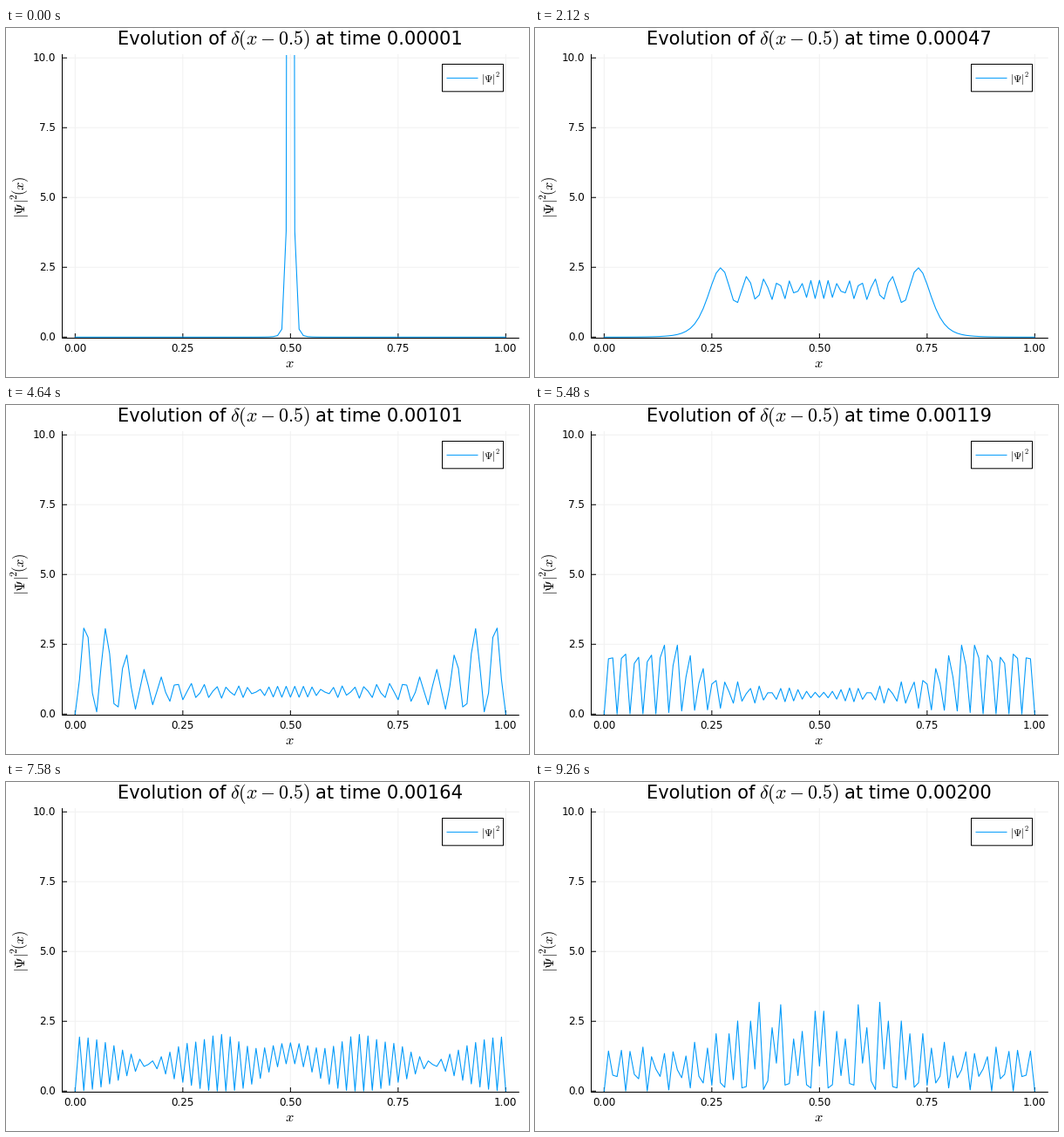
A matplotlib script for the animation above (9.28 s loop, 600 by 400 pixels).

```python
import numpy as np
import matplotlib.pyplot as plt
from matplotlib.animation import FuncAnimation
from matplotlib.patches import Rectangle

plt.rcParams.update({"font.family": "DejaVu Sans", "mathtext.fontset": "cm",
                     "path.snap": False})

W, H, DPI = 600, 400, 100
PX = 72 / DPI                      # one pixel in points
BLUE = "#009AFA"
LEFT, RIGHT, TOP, BOTTOM = 64.5, 588.3, 30.5, 355.5
DT, STEPS = 1e-5, 200
TICK_MS, TICKS = 20, 464


def to_x(x):
    return 79.35 + 494 * x


def to_y(y):
    return 354.25 - 32 * y


# Delta at the centre of an infinite well: only odd sine modes take part.
x = np.linspace(0, 1, 101)
modes = np.arange(1, 100, 2)
basis = 0.2 * np.sin(modes * np.pi / 2) * np.sin(np.pi * np.outer(x, modes))
times = DT * np.arange(1, STEPS + 1)
phases = np.exp(-1j * np.outer((modes * np.pi) ** 2, times))
density = np.abs(basis @ phases).T ** 2

fig = plt.figure(figsize=(W / DPI, H / DPI), dpi=DPI, facecolor="white")
ax = fig.add_axes([0, 0, 1, 1])
ax.set(xlim=(0, W), ylim=(H, 0))
ax.axis("off")


def line(xs, ys, color="black", width=1.0, **kw):
    return ax.plot(xs, ys, color=color, lw=width * PX, **kw)[0]


def label(px, py, text, size, **kw):
    return ax.text(px, py, text, fontsize=size * PX, va="baseline", **kw)


def squared_psi(px, py, size, tail="", upright=True):
    """|Psi| with a high, tight exponent, reading rightwards or upwards."""
    parts = [(r"$|\Psi|$", 0, 0, 1), ("$2$", 1.3, 0.52, 0.7)]
    if tail:
        parts.append((tail, 1.62, 0, 1))
    for text, along, up, scale in parts:
        a, u = along * size, up * size
        pos = (px + a, py - u) if upright else (px - u, py - a)
        label(*pos, text, scale * size, rotation=0 if upright else 90,
              rotation_mode="anchor", zorder=5)


for v in np.linspace(0, 1, 5):
    gx, gy = to_x(v), to_y(10 * v)
    line([gx, gx], [TOP, BOTTOM], "0.945", zorder=1)
    line([LEFT, RIGHT], [gy, gy], "0.945", zorder=1)
    line([gx, gx], [BOTTOM, BOTTOM - 5], zorder=2)
    line([LEFT, LEFT + 5], [gy, gy], zorder=2)
    label(gx, 371, f"{v:.2f}", 12, ha="center")
    label(57, gy + 3.9, f"{10 * v:.1f}", 12, ha="right")

line([LEFT, LEFT], [TOP, BOTTOM], zorder=2)
line([LEFT, RIGHT], [BOTTOM, BOTTOM], zorder=2)

label(325.8, 388.7, "$x$", 16.5, ha="center")
squared_psi(21.5, 218.5, 16.5, "$(x)$", upright=False)

label(128, 19, "Evolution of", 21)
label(257, 19, r"$\delta(x-0.5)$", 21.9)
clock = label(355, 19, "", 21)

curve = line([], [], BLUE, 1.08, zorder=3, solid_joinstyle="round")
curve.set_clip_path(Rectangle((LEFT, TOP), RIGHT - LEFT, BOTTOM - TOP,
                              transform=ax.transData))

ax.add_patch(Rectangle((500.5, 41.5), 70, 31.3, fc="white", ec="black",
                       lw=PX, zorder=4))
line([506, 541], [57.4, 57.4], BLUE, zorder=5)
squared_psi(545, 62, 12)


def step_at(tick):
    """Three steps share seven ticks; the middle one holds for five."""
    block, r = divmod(tick, 7)
    return 3 * block + (r > 0) + (r > 5)


def update(tick):
    k = step_at(tick)
    curve.set_data(to_x(x), to_y(density[k]))
    clock.set_text(f"at time {times[k]:.5f}")
    return curve, clock


anim = FuncAnimation(fig, update, frames=TICKS, interval=TICK_MS,
                     repeat=True, repeat_delay=0, cache_frame_data=False)
plt.show()
```
